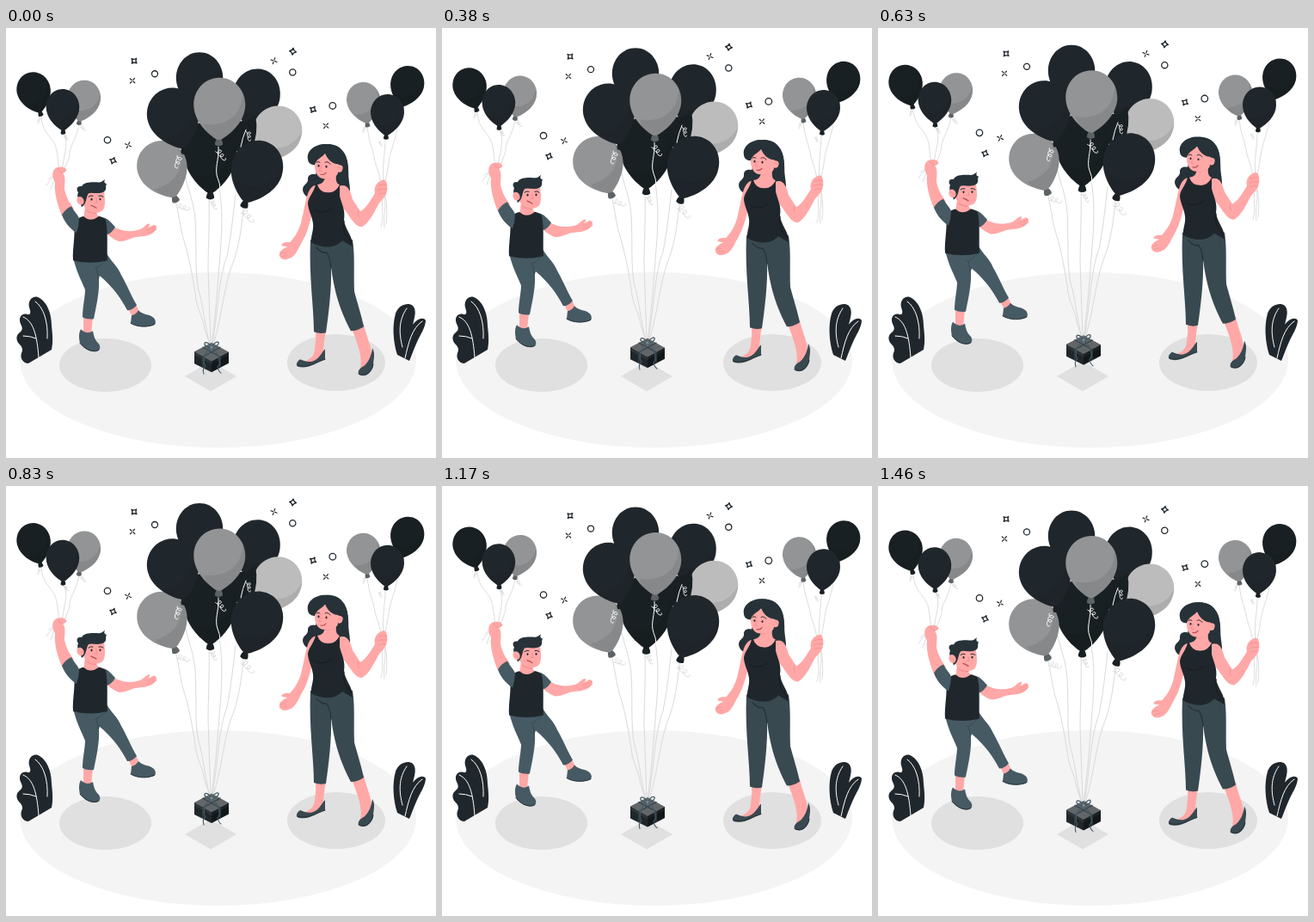
These frames come from a looping animation (500x500 px, 1500 ms). An HTML page with a canvas:

```html
<!DOCTYPE html>
<html lang="en">
<head>
<meta charset="utf-8">
<title>Floating balloons</title>
<style>
html, body { margin: 0; width: 100%; height: 100%; overflow: hidden; background: #fff; }
canvas { display: block; width: 100vw; height: 100vh; }
</style>
</head>
<body>
<canvas id="stage"></canvas>
<script>
const SIZE = 500, LOOP = 1500, RISE = 10, LEAD = 25, REST = .6;
const INK = '#20272c', DEEP = '#192023', HAIR = '#263238', SLATE = '#465a64', STEEL = '#394950';
const SKIN = '#ffa8a7', BLUSH = '#f28f8f', GREY = '#929496', PALE = '#bcbcbd', STRING = '#dadada';

const canvas = document.getElementById('stage');
const ctx = canvas.getContext('2d');
const ratio = window.devicePixelRatio || 1;
canvas.width = canvas.height = SIZE * ratio;

const paths = new Map();
function path(d) {
  if (!paths.has(d)) paths.set(d, new Path2D(d));
  return paths.get(d);
}
function fill(color, d) {
  ctx.fillStyle = color;
  ctx.fill(path(d));
}
function line(color, width, ...ds) {
  ctx.strokeStyle = color;
  ctx.lineWidth = width;
  for (const d of ds) ctx.stroke(path(d));
}
function oval(color, x, y, rx, ry = rx, turn = 0) {
  ctx.fillStyle = color;
  ctx.beginPath();
  ctx.ellipse(x, y, rx, ry, turn, 0, Math.PI * 2);
  ctx.fill();
}
function placed(x, y, degrees, draw) {
  ctx.save();
  ctx.translate(x, y);
  ctx.rotate(degrees * Math.PI / 180);
  draw();
  ctx.restore();
}

const EGG = new Path2D('M0 -1C.57 -1 1 -.6 1 -.13C1 .38 .5 .78 .13 .98Q0 1.04 -.13 .98C-.5 .78 -1 .38 -1 -.13C-1 -.6 -.57 -1 0 -1Z');
const SHADE = new Path2D('M.88 -.6C.96 .1 .35 .62 -.62 .5L-.3 1.1L1.2 1.1L1.2 -.5Z');

function balloon(x, y, rx, ry, tilt, color) {
  placed(x, y, tilt, () => {
    const k = rx / 30;
    ctx.fillStyle = color === PALE ? GREY : color === GREY ? '#5d6264' : DEEP;
    ctx.beginPath();
    ctx.moveTo(-2 * k, ry - 2);
    ctx.quadraticCurveTo(-5 * k, ry + 3 * k, -4.5 * k, ry + 6 * k);
    ctx.quadraticCurveTo(0, ry + 9 * k, 4.5 * k, ry + 6 * k);
    ctx.quadraticCurveTo(5 * k, ry + 3 * k, 2 * k, ry - 2);
    ctx.fill();
    ctx.scale(rx, ry);
    ctx.fillStyle = color;
    ctx.fill(EGG);
    ctx.clip(EGG);
    ctx.fillStyle = 'rgba(0,0,0,.08)';
    ctx.fill(SHADE);
  });
}

function curl(x, y, tilt, length, color) {
  placed(x, y, tilt, () => {
    const r = length / 5;
    ctx.beginPath();
    for (let i = 0; i <= 50; i++) {
      const u = i / 50, a = u * Math.PI * 5;
      ctx.lineTo((u - .5) * length + r * Math.sin(a), r * Math.cos(a) * (1.2 - .5 * u));
    }
    ctx.strokeStyle = color;
    ctx.lineWidth = .9;
    ctx.stroke();
  });
}

function star(x, y, tilt) {
  placed(x, y, tilt, () => line(INK, 1.3, 'M0 -4Q.8 -.8 4 0Q.8 .8 0 4Q-.8 .8 -4 0Q-.8 -.8 0 -4Z'));
}
function spark(x, y, tilt) {
  placed(x, y, tilt, () => line(INK, 1.2, 'M0 -3.7V-1.2M0 1.2V3.7M-3.7 0H-1.2M1.2 0H3.7'));
}
function ring(x, y, r) {
  ctx.beginPath();
  ctx.arc(x, y, r, 0, Math.PI * 2);
  ctx.strokeStyle = INK;
  ctx.lineWidth = 1.3;
  ctx.stroke();
}

function ground() {
  oval('#f4f4f4', 246.5, 386, 230.5, 102);
  oval('#e0e0e0', 115.5, 392, 53.5, 31);
  oval('#e0e0e0', 384, 389, 57, 33);
  fill('#e0e0e0', 'M208 405L238 387.5L268 405L238 422.5Z');

  fill(INK, 'M26 390C20 390 16 384 18 378C20 374 19 371 15 367C11 362 12 357 16 354C20 351 19 348 17 344C14 337 18 331 25 333C29 334 29 330 27 325C25 317 31 311 37 313C47 317 53 331 53 346C54 356 55 365 53 374Z');
  line('#fff', 1, 'M34 318C44 325 49 342 48 361', 'M20 336C32 341 36 357 38 383', 'M20 358Q28 358 35 361');
  fill(INK, 'M455 380C450 365 449 345 453 332C457 321 468 319 473 323C478 328 475 337 473 345C477 339 485 335 488 340C488 348 481 358 478 365C474 374 472 380 469 387Z');
  line('#fff', 1, 'M466 326C456 340 457 356 461 371', 'M484 341C472 349 468 366 464 384');
}

function confetti() {
  star(149, 38, 42); star(333.5, 27, 8); star(357, 94.5, 30); star(124.5, 154, 22);
  spark(147, 61, 42); spark(311.5, 38, 20); spark(142, 136, 25); spark(372, 113.5, 40);
  ring(173, 53, 3.5); ring(333.3, 51.3, 3.6); ring(118, 130, 3.7); ring(379.8, 90.2, 3.8);
}

function gift() {
  fill('#20272b', 'M219 376L239 387L239 400L219 390Z');
  fill('#12181a', 'M239 387L259 376.5L259 389.5L239 400Z');
  fill('#626668', 'M219 376L239 365.5L259 376.5L239 387.5Z');
  fill('#2c3438', 'M219 376L239 387.5L239 391L219 380Z');
  fill('#1b2124', 'M259 376.5L239 387.5L239 391L259 380.5Z');
  line('#364850', 1.4, 'M229 371L249 382V394', 'M249 371L229 382V394');
  line(SLATE, 1.1, 'M239 371C231 376 228 388 232 393Q228 396 230 402', 'M239 371C246 376 251 389 246 394Q247 399 250 401');
  line(SLATE, 1.3, 'M239 371C234 363 230 365 231 368Q234 372 239 371C244 363 248 364 247 367Q245 371 239 371');
  oval('#78909c', 239, 371, 1.6, 1.4);
}

function bunch() {
  line(STRING, 1,
    'M198 204C202 222 203 235 207 247C214 270 217 290 220 308C221 325 229 335 231 350Q235 362 237 368',
    'M205 147C206 178 218 195 220 222C222 250 219 285 224 305C229 320 231 345 237 368',
    'M236 198C237 225 235 255 235 280C236 310 237 337 238 368',
    'M248 185C252 210 251 230 250 250C247 285 245 325 239 368',
    'M267 193C264 218 262 240 257 265C247 292 247 325 240 368',
    'M276 209C274 232 271 252 265 270C253 298 252 333 241 368');
  balloon(225, 62, 27.2, 34, 0, INK);
  balloon(290.5, 82, 27.5, 35, 10, INK);
  balloon(313.5, 123.5, 28.5, 34, 28, PALE);
  fill(DEEP, 'M206 122L228 108H280L290 101Q294 122 286 140L230 150Z');
  balloon(237.5, 150.5, 30.5, 41, 0, DEEP);
  balloon(183, 164.5, 29, 34, -22, GREY);
  balloon(195.5, 105, 30, 36, -18, INK);
  balloon(290.5, 167, 30, 37, 19, INK);
  line('#fff', 1, 'M279 118Q275 127 273 138', 'M247 138C248 153 242 163 246 174Q249 180 249 188');
  balloon(248.2, 93.5, 30, 36, 1, GREY);
  curl(200, 155, 110, 13, '#fff');
  curl(250, 147, 55, 13, '#fff');
  curl(282.5, 125, 85, 10, '#fff');
  curl(206, 208, 20, 13, STRING);
  curl(241.5, 205, 65, 10, STRING);
  curl(281, 218, 50, 16, STRING);
}

function boyBalloons() {
  line(STRING, .9,
    'M41 103C43 126 56 125 59 143Q61 155 62 168',
    'M67 123C74 138 66 148 65 168',
    'M85 112C82 130 72 140 74 148Q71 160 65 168',
    'M61 170Q52 174 47 183', 'M61 170Q54 178 52 187', 'M62 170Q58 176 57 185', 'M61 168L49 176');
  curl(38.5, 107, 110, 6, STRING);
  curl(70, 127, 60, 6, STRING);
  curl(89.5, 116, 50, 7, STRING);
  balloon(90, 84.3, 19.5, 24, 11, GREY);
  balloon(33, 74.8, 19.6, 24, -16, DEEP);
  balloon(66, 94.8, 19.3, 24, -1, INK);
}

function boy() {
  boyBalloons();
  // legs
  fill(SKIN, 'M90 334L101 336L99 355L90 354ZM142 326L151 321L156 332L148 338Z');
  fill(SLATE, 'M117 262C123 272 130 277 134 287C141 299 146 312 152 322Q147 328 141 328C134 315 126 302 108 287Z');
  fill(SLATE, 'M78 266H117C117 275 110 283 108 291C109 306 105 323 102 338Q94 339 89 336C89 325 92 312 92 304C87 292 81 281 78 266Z');
  line('#364850', 1, 'M116 270Q109 278 104 279Q107 282 107 291');
  fill(SLATE, 'M87 350C84 355 85 362 86 366C90 372 97 376 103 376C110 376 111 370 107 366C103 362 102 357 101 352Q94 357 87 350Z');
  fill(SLATE, 'M146 334Q151 333 154 328C160 334 167 332 172 337C176 342 173 346 169 346C160 348 152 347 145 343Z');
  line(HAIR, 1, 'M86 366C92 374 102 378 108 374', 'M145 343C153 348 166 348 173 344');
  // arms
  fill(SKIN, 'M65 218C59 203 56 191 57 179C53 173 53 165 59 162C65 160 71 162 70 166L66 168C70 173 68 180 68 187C70 197 74 203 79 210Z');
  line(BLUSH, .8, 'M60 163Q61 167 66 168Q69 167 70 165');
  fill(SKIN, 'M123 229C132 236 143 237 152 235C158 234 160 231 164 228C168 226 168 229 165 232L172 228.5C177 230 175 235 171 238C166 242 158 242 150 243C143 245 138 248 132 248C126 246 120 242 117 238Z');
  line(BLUSH, .7, 'M174 231Q168 234 164 235', 'M175 234Q169 237 165 238');
  fill(SLATE, 'M112 220C119 221 123 227 127 231Q124 237 118 240L114 234Z');
  // torso
  fill(INK, 'M79 227Q83 219 92 218.5L107 218.5Q113 219 116 223C119 238 117 255 118 270Q98 275 78 270C77 256 81 241 79 227Z');
  fill(SLATE, 'M65 217Q69 210 76 207C79 213 83 216 85 221Q85 230 82 238C73 232 68 225 65 217Z');
  fill(SKIN, 'M92 207H106L105 215L107.5 219Q98 226 90.5 219Z');
  line(BLUSH, 1.5, 'M94 212Q99 216 105 215');
  // head
  fill(SKIN, 'M90 190C95 183 111 184 114 190C115 198 116 206 113 211C108 217 97 215 93 210L89 205Z');
  fill(HAIR, 'M88 208C87 203 81 196 84 191C81 187 83 183 88 184C91 178 101 179 106 179Q111 180 115 175.5Q113 180 117 181C115 184 118 187 114 190C107 194 100 190 96 192C93 196 94 202 90 206Z');
  oval(SKIN, 86.5, 200.5, 4, 5, -.4);
  line(BLUSH, .8, 'M85 199Q88 200 88 203');
  oval(INK, 99.5, 199, 1, 1.4);
  oval(INK, 109.5, 198.8, 1, 1.4);
  line(INK, 1, 'M96 196Q98 194 101 195', 'M108 195Q111 194 113 196');
  line(BLUSH, 1, 'M105 198L106 203L103 203');
  line('#b84c54', 1.3, 'M99 206Q102 207 105 209');
}

function girlBalloons() {
  line(STRING, .9,
    'M420 114C422 134 427 140 429 155Q434 168 437 184',
    'M441 129C441 147 437 158 439 184',
    'M457 98C456 126 447 140 445 156Q443 170 440 184',
    'M438 195C436 208 440 218 436 231', 'M440 195C443 208 438 216 440 232', 'M441 195Q444 208 442 228');
  curl(416.5, 118, 110, 6, STRING);
  curl(435.5, 134, 70, 6, STRING);
  balloon(466, 67.5, 19.6, 24, 14, DEEP);
  balloon(416.2, 86.6, 19.6, 24, -9, GREY);
  balloon(443.3, 100.7, 19.5, 24, 3, INK);
}

function girl() {
  girlBalloons();
  // hair behind the shoulders
  fill(HAIR, 'M354 145C362 132 383 132 391 142C400 152 397 164 399 179C401 191 400 200 397 209L381 197L360 196C354 201 346 195 345 188C345 181 352 181 351 175C351 170 356 169 360 170L366 150Z');
  // legs
  fill(SKIN, 'M360 350L372 352C370 362 369 370 369 380L356 389L345 388C354 386 359 380 359 373Q361 362 360 350Z');
  fill(SKIN, 'M402 349L416 344C418 356 424 366 425 379L418 395L411 399C416 386 410 370 402 349Z');
  fill(STEEL, 'M354 246H403C406 266 404 285 405 306C409 321 413 333 416 347Q409 352 401 352C392 335 382 312 378 277C379 302 375 333 372 354Q365 356 358 353C358 324 352 288 354 246Z');
  line(HAIR, 1.3, 'M361 255Q367 262 373 261Q377 267 378 279');
  fill(STEEL, 'M342 385C337 388 336 394 342 394C353 396 362 388 371 385V373C367 377 364 385 357 387C352 389 347 387 342 385Z');
  fill(STEEL, 'M426 372C430 379 427 385 427 393C424 402 418 406 411 403C407 399 413 394 416 393C422 388 425 380 426 372Z');
  line(HAIR, 1, 'M339 392C350 396 361 388 371 385', 'M410 402C418 406 425 400 427 391');
  // arms
  fill(SKIN, 'M362 182C349 183 349 204 344 222C342 234 335 244 330 249C324 248 319 251 321 253L327 254C321 257 317 260 318 265C321 271 328 269 333 266C338 262 341 254 345 247C352 235 354 221 358 208Z');
  line(BLUSH, .7, 'M319 262Q323 260 325 261', 'M321 266Q325 263 327 264');
  fill(SKIN, 'M387 184C396 180 400 187 403 199L412 213C419 209 424 200 429 192C427 184 432 178 439 176C443 177 444 183 443 188C443 194 438 199 434 203C428 214 422 227 414 231C407 232 401 221 396 214C389 207 386 197 387 184Z');
  line(BLUSH, .8, 'M433 183Q437 181 442 182', 'M432 188Q437 186 443 187', 'M433 193Q437 191 441 192', 'M410 212Q408 216 410 220');
  // torso
  fill(INK, 'M360 181C359 190 352 195 351 203C351 211 356 218 357 227C358 236 354 242 355 249C361 253 370 255 378 254C384 253 388 250 391 247L403 254C404 242 394 234 393 223C395 211 390 204 388 195L388 181L382 184L367 184Z');
  line('#161c20', 1, 'M358 211Q368 218 379 209', 'M393 224C391 239 397 244 402 249');
  fill(SKIN, 'M371 171H384C383 178 385 181 388 182Q383 192 374 191Q365 191 362 182Q371 181 371 171Z');
  line(BLUSH, 1.8, 'M372 175Q378 176 382 170');
  // head
  fill(SKIN, 'M361 151C365 144 380 144 386 154L389 160C393 160 392 167 387 168C384 173 376 177 370 175C364 175 359 169 359 160Z');
  fill(HAIR, 'M351 152C349 142 361 133 375 135C391 136 397 149 398 163C399 178 395 187 389 181C384 175 386 168 386 167C391 165 390 160 386 158C380 158 373 152 371 145C369 150 361 151 359 159C354 159 351 156 351 152Z');
  oval(SKIN, 388, 163.3, 3.5, 4.3, .3);
  line(BLUSH, .8, 'M387 162Q390 161 390 164');
  oval(INK, 363.5, 160, 1, 1.4);
  oval(INK, 372.5, 161, 1, 1.4);
  line(INK, .9, 'M361 156Q363 154 365 156', 'M371 156Q374 154 377 158');
  line(BLUSH, 1, 'M367 160L364 165L367 166');
  line('#b84c54', 1.2, 'M366 170Q370 171 372 168');
}

function frame(now) {
  const phase = ((now + LEAD) % LOOP) / LOOP;
  const lift = RISE * (1 - Math.abs(2 * phase - 1));
  ctx.setTransform(ratio, 0, 0, ratio, 0, 0);
  ctx.lineCap = ctx.lineJoin = 'round';
  ctx.fillStyle = '#fff';
  ctx.fillRect(0, 0, SIZE, SIZE);
  ground();
  ctx.translate(0, REST - lift);
  confetti();
  bunch();
  gift();
  boy();
  girl();
}

const start = performance.now();
function tick() {
  frame(performance.now() - start);
  requestAnimationFrame(tick);
}
tick();
</script>
</body>
</html>
```
